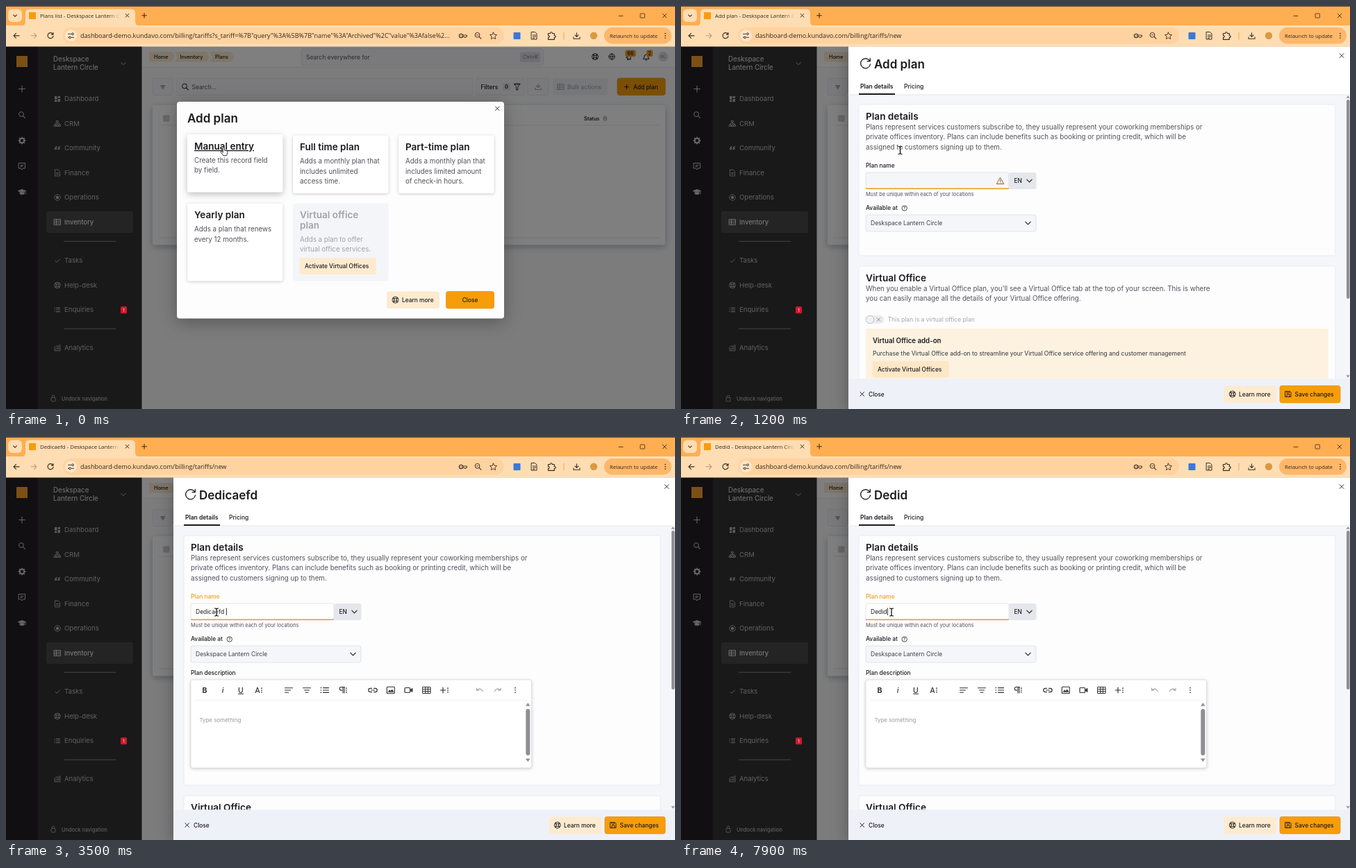
An HTML page that plays this animation: 963 px wide and 581 px high, repeating every 8 s.

```html
<!DOCTYPE html>
<html lang="en">
<head>
<meta charset="utf-8">
<title>Add plan</title>
<style>
html, body { margin: 0; width: 100%; height: 100%; overflow: hidden; background: #fff; }
svg { display: block; width: 963px; height: 581px; font-family: Inter, Roboto, sans-serif; }
text { white-space: pre; }
.chrome { font-family: "Open Sans", "Noto Sans", sans-serif; }
.card { filter: drop-shadow(0 1px 2px rgba(0,0,0,.2)); }
.lift { filter: drop-shadow(0 3px 5px rgba(0,0,0,.25)); }
.float { filter: drop-shadow(0 5px 12px rgba(0,0,0,.3)); }
</style>
</head>
<body>
<svg id="stage" viewBox="0 0 963 581"></svg>
<script>
const INK = '#1b1b1f', GREY = '#52525b', PALE = '#a3a5ae', LINE = '#e3e4e9';
const AMBER = '#f79d0a', CREAM = '#fdebd0', NAV = '#b9b7ba', THUMB = '#8f8f93';
const BODY = 9.77, SMALL = 8.5;
const SPACE = ['Deskspace', 'Lantern Circle'], PLACE = SPACE.join(' ');

// y is the vertical centre of the text
const T = (x, y, size, str, c = INK, w = 400, more = '') =>
  `<text x="${x}" y="${y + size * .36}" font-size="${size}" fill="${c}" font-weight="${w}" ${more}>${str}</text>`;
const R = (x, y, w, h, c, r = 0, more = '') =>
  `<rect x="${x}" y="${y}" width="${w}" height="${h}" rx="${r}" fill="${c}" ${more}/>`;
const P = (d, c = INK, w = 1, fill = 'none', more = '') =>
  `<path d="${d}" stroke="${c}" stroke-width="${w}" fill="${fill}" stroke-linecap="round" stroke-linejoin="round" ${more}/>`;
const C = (x, y, r, c, w = 0, fill = 'none') =>
  `<circle cx="${x}" cy="${y}" r="${r}" stroke="${c}" stroke-width="${w}" fill="${w ? fill : c}"/>`;
const G = (x, y, body, turn = 0) => `<g transform="translate(${x} ${y}) rotate(${turn})">${body}</g>`;
const border = c => `stroke="${c}" stroke-width=".8"`;
const middle = 'text-anchor="middle"';
const lines = (x, y, rows) => rows.map((s, i) => T(x, y + i * 14.6, BODY, s, GREY)).join('');
const action = (x, y, w, h = 24.5) => R(x, y, w, h, AMBER, 3, border('#e8930a'));

// Icons, centred on x, y
const cross = (x, y, r, c = INK, w = 1) => P(`M${x - r} ${y - r}l${2 * r} ${2 * r}m0 ${-2 * r}l${-2 * r} ${2 * r}`, c, w);
const plus = (x, y, r, c = INK, w = 1.1) => P(`M${x - r} ${y}h${2 * r}M${x} ${y - r}v${2 * r}`, c, w);
const chevron = (x, y, r, c = INK, w = 1.1) => P(`M${x - r} ${y - r / 2}l${r} ${r}l${r} ${-r}`, c, w);
const lens = (x, y, c = INK, r = 3.4) => C(x - 1, y - 1, r, c, 1) + P(`M${x + 1.6} ${y + 1.6}l2.8 2.8`, c, 1.1);
const buoy = (x, y, c = INK, r = 4.4) => C(x, y, r, c, 1) + C(x, y, r * .45, c, .9) +
  [45, 135, 225, 315].map(a => G(x, y, P(`M${r * .5} 0H${r}`, c, 1.4), a)).join('');
const gear = (x, y, c) => C(x, y, 3.2, c, 2) + [0, 45, 90, 135].map(a => G(x, y, P('M0-4.6v1.4M0 3.2v1.4', c, 1.8), a)).join('');
const sorter = (x, y) => P(`M${x - 2.5} ${y - 1.2}l2.5-2.8 2.5 2.8zm0 2.4l2.5 2.8 2.5-2.8z`, '#85858d', .8);
const rows = (x, y, widths, gap = 2.6, c = INK) => widths.map((w, i) =>
  P(`M${x} ${y + (i - (widths.length - 1) / 2) * gap}h${w}`, c, 1.1)).join('');
const dots = (x, y, c = INK, gap = 2.8) => [-1, 0, 1].map(i => C(x, y + i * gap, .85, c)).join('');
const disk = (x, y) => P(`M${x - 4} ${y - 4}h6.5l1.5 1.5v6.5h-8zM${x - 2} ${y - 4}v2.5h3.5v-2.5M${x - 2} ${y + 4}v-3.5h4v3.5`, INK, .9);
const download = (x, y, c) => G(x, y, P('M0-4V1.5M-2.5-1L0 1.5 2.5-1M-4.5 2V4.5h9V2', c, 1.1));
const table = (x, y, c) => P(`M${x - 4.5} ${y - 4}h9v8h-9zm0 2.6h9m-9 2.7h9M${x - 1.5} ${y - 4}v8`, c, .9);

function browser() {
  const k = '#3c2e20', bar = '#ffddb3';
  return `<g class="chrome">` + R(0, 0, 963, 29, '#ffae51') + R(0, 0, 963, 1, '#6e4c28') +
    R(3, 4.5, 20, 18.5, bar, 6) + chevron(13, 14, 2.4, k) +
    P('M22 28.5q6 0 6-6v-12q0-6 6-6h146q6 0 6 6v12q0 6 6 6z', 'none', 0, bar) +
    R(33, 9, 10, 10, AMBER) +
    `<text id="tab" x="49" y="16.8" font-size="7.8" fill="#33271c" clip-path="url(#tabClip)"></text>` +
    R(148, 8, 16, 13, 'url(#fade)') + cross(174.5, 13.7, 2.4, k) + plus(199, 13.7, 3.4, k) +
    P('M882 14.3h6', k, .9) + R(913, 11, 6.4, 6, 'none', .6, border(k)) + cross(948, 14, 2.8, k, .9) +
    R(0, 28, 963, 30.5, bar) +
    P('M19 42.8h-8m3.5-3.5L11 42.8l3.5 3.5', k, 1.2) + P('M36 42.8h8m-3.5-3.5l3.5 3.5-3.5 3.5', '#b99a78', 1.1) +
    P('M67.6 40.8a4 4 0 1 0 .4 2.6M68 38.5v2.6h-2.6', k, 1.2) +
    R(82, 30.8, 635, 24, '#ffd3a0', 12) + C(93.5, 42.8, 8.5, '#ffe6ca') +
    P('M89.5 40.3h4M89.5 45.3h1m4 0h3', k, 1) + C(96, 40.3, 1.4, k, 1) + C(92, 45.3, 1.4, k, 1) +
    `<text id="url" x="107" y="46" font-size="9.08" fill="#33271c"></text>` +
    C(655, 43, 2.7, k, 1.1) + C(655, 43, .8, k) + P('M658 42h5.5v2.2h-1.5v1h-2v-1h-2', k, .9) +
    lens(679.5, 42.8, k) + P('M677 41.8h3', k, .8) +
    P('M701.5 38l1.5 3.2 3.5.4-2.6 2.4.7 3.5-3.1-1.7-3.1 1.7.7-3.5-2.6-2.4 3.5-.4z', k, .9) +
    R(730.5, 38, 10, 10, '#3b78d8', 1) +
    P('M756.5 37.5h5l2.5 2.5v8h-7.5zM758.5 42h4m-4 2.2h4m-4 2.2h2', k, 1) +
    P('M780.5 39.5h3q0-2 1.4-2t1.4 2h3v3q2 0 2 1.4t-2 1.4v3h-8.8v-3q1.7 0 1.7-1.4t-1.7-1.4z', k, 1.2) +
    P('M803 38v10', '#f3a54d', 1) + download(821.5, 42.8, k) + C(846, 42.8, 5.2, '#d99a3d') +
    R(861, 31, 97, 23.5, '#ffb769', 11.8) + T(869, 42.8, 7.6, 'Relaunch to update', '#33271c', 500) + dots(949, 42.8, k, 3.2) + `</g>`;
}

function sidebar() {
  const items = [['Dashboard', 134], ['CRM', 169.5], ['Community', 205], ['Finance', 240.5], ['Operations', 276],
    ['Inventory', 311.5], ['Tasks', 367], ['Help-desk', 402.5], ['Enquiries', 438], ['Analytics', 493]];
  const icons = [
    R(-4, -4, 3.4, 4.6, NAV) + R(.6, -4, 3.4, 2.8, NAV) + R(-4, 1.6, 3.4, 2.6, NAV) + R(.6, 0, 3.4, 4.2, NAV),
    P('M-1.3-4h2.6v2h-2.6zM0-2V0M-3.2 2V0h6.4v2M-4.4 2h2.4v2h-2.4zm3.3 0h2.4v2h-2.4zm3.3 0h2.4v2h-2.4z', NAV, .9),
    P('M-.8-2.5q-3 1-2.7 4h2v-2.2h-1.6M3.6-2.5q-3 1-2.7 4h2v-2.2H1.3', NAV, 1.1),
    P('M-3.2-4.5h4.2l2.5 2.5v6.5h-6.7zM-1.5 0h3.2m-3.2 2h3.2', NAV, .9),
    C(0, 0, 4.2, NAV, .9) + R(-2, -2, 4, 4, NAV, 1),
    table(0, 0, '#e8e7e9'),
    P('M-3 .5l2 2 4.5-4.5', NAV, 1),
    buoy(0, 0, NAV, 4.2),
    rows(-1.5, 0, [5, 5, 5], 2.6, NAV) + rows(-4, 0, [.3, .3, .3], 2.6, NAV),
    P('M-4-1v5h8v-8M-2 2v-1.5M0 2v-3M2 2v-4M-3-2l2-1 2 .5 2-2', NAV, .9)];
  const c = '#cbc9cc';
  return R(0, 58, 46, 523, '#221f22') + R(46, 58, 149.5, 523, '#343235') + R(15, 72, 16, 16, '#f7a12c') +
    plus(23, 119.5, 4.4, c) + lens(23, 157, c) + gear(23, 194, c) +
    P('M18.5 226.5h9v7.5h-3l-1.5 2-1.5-2h-3zM21 229.5h4m-4 2h2.5', c, 1) +
    P('M17.5 266.5l5.5-2 5.5 2-5.5 2zM20 268.5v2.5q3 1.5 6 0v-2.5M28 267v4', c, .9, c) +
    T(68, 77, 9.7, SPACE[0], '#d6d4d7', 500) + T(68, 89, 9.7, SPACE[1], '#d6d4d7', 500) + chevron(169, 83, 3.3, NAV, 1) +
    R(58, 296, 125, 31, '#4a484b', 3) +
    items.map(([s, y], i) => G(74, y, icons[i]) + T(84, y, i == 5 ? 9.3 : 9.6, s, i == 5 ? '#f2f1f3' : '#c3c1c4', i == 5 ? 500 : 400)).join('') +
    P('M83.5 339.3h74.5M83.5 465.3h74.5', '#a09ea1', .8) +
    R(65, 564.5, 6, 5.5, 'none', 1, border(NAV)) + P('M66.3 564v-1.2a1.7 1.7 0 0 1 3.4 0v1.2', NAV, .8) +
    T(80, 566, 7.4, 'Undock navigation', '#bab8bb', 500);
}

const badge = R(165, 433.3, 9, 10, '#cf1a2c', 1.5, 'id="badge"') + T(169.5, 438.3, 6.8, '1', '#f4e4e4', 400, middle);

function listPage() {
  const crumb = (x, w, s, tx) => P(`M${x} 66h${w}l4 7.2-4 7.2h${-w}l${x > 210 ? 4 : 0}-7.2z`, 'none', 0, '#fdecd2') + T(tx, 73.2, 7.3, s, INK, 500);
  const field = (x, w, y = 104, h = 24.5) => R(x, y, w, h, '#f5f6f9', 3, border(LINE));
  const note = (x, w, s) => R(x, 63.5, w, 9.5, '#f2a127', 2) + T(x + w / 2, 68.3, 7, s, INK, 500, middle);
  return R(195.5, 58, 768, 523, '#f9fafc') + R(195.5, 58, 768, 30, '#fff') + P('M196 88h767', LINE, .8) +
    crumb(206, 33, 'Home', 213) + crumb(243, 46, 'Inventory', 250.5) + crumb(293, 31, 'Plans', 301) +
    field(425, 348.5, 61.5, 24) + T(432, 73.5, SMALL, 'Search everywhere for', GREY) +
    R(740, 66.5, 29, 14.5, '#dfe0e6', 2) + T(744, 73.7, 7.2, 'Ctrl+K', '#71717a') +
    buoy(848, 73, INK) + C(872, 73, 4.2, INK, .9) + P('M868 73h8M872 69q-3.5 4 0 8q3.5-4 0-8', INK, .8) +
    P('M893 74l6-3v6zM894.5 75.5v2h2', INK, 1) + P('M917.5 76q1.3-1 1.3-3.3 0-2.7 2.7-2.7t2.7 2.7q0 2.3 1.3 3.3zM920.5 78h2', INK, 1) +
    note(891.5, 15, '66') + note(922, 9, '2') + C(946, 73, 7.2, '#dcdde3') + T(946, 73.2, 6, 'AL', '#77777f', 400, middle) +
    field(211, 29) + [6, 3.6, 1.2].map((w, i) => P(`M${225.7 - w / 2} ${115 + i * 2}h${w}`, GREY, .9)).join('') +
    field(246, 426) + lens(258, 116.5) + T(267.5, 116.5, SMALL, 'Search...', GREY) +
    field(677, 69) + T(683.5, 116.5, 8.4, 'Filters', INK, 500) + R(715, 111, 11, 11, '#e3e4ea', 2) + T(718, 116.7, 7.3, '0', INK, 600) +
    P('M731.5 112.5q4.2-2 8.5 0l-3.2 4v4.5h-2.2v-4.5zq4.2 2 8.5 0', INK, .9) +
    field(750, 31) + download(766, 116, PALE) +
    R(787, 104, 79, 24.5, '#eeeff3', 3) + table(798.5, 116.5, PALE) + T(808, 116.5, 8.4, 'Bulk actions', PALE, 500) +
    action(880, 104, 69) + plus(893.5, 116.5, 3) + T(903, 116.5, 8.4, 'Add plan', INK, 500) +
    R(211, 143, 738, 201.5, '#fff', 3, 'class="lift"') + R(226, 157.3, 9.5, 9.5, '#cfcfd4', 2) +
    T(245.5, 162, 7.2, 'Name', INK, 600) + P('M273 165v-6m-2.5 2.5l2.5-2.5 2.5 2.5', INK, .9) +
    T(577.5, 162, 7.2, 'Price', INK, 600) + sorter(603, 162) + T(618, 162, 7.2, 'Frequency', INK, 600) +
    T(832, 162, 7.2, 'Status', INK, 600) + sorter(862.3, 162) + P('M220 172h720M220 334h720', LINE, .8) +
    C(573, 207.5, 4.6, '#4a4a52', 1.2) + C(586.7, 207.5, 4.6, '#4a4a52', 1.2) +
    P('M577.5 207q2.3-1.5 4.6 0M568.3 207v-9q0-3 3-3M591.5 207v-9q0-3-3-3', '#4a4a52', 1.2) +
    T(580, 233.5, BODY, 'No items found', '#3f3f46', 400, middle) +
    R(518.5, 246, 122.5, 19, '#e8e9ee', 2) + T(580, 255.5, 8.4, 'Show data for all locations', INK, 500, middle) +
    P('M564 280h31', LINE, 1) + R(542, 295, 75.5, 19, '#e8e9ee', 2) + buoy(554, 304.5) + T(563.5, 304.5, 8.4, 'Learn more', INK, 500);
}

function modal() {
  const card = (x, y, h, title, text, cls = 'card', deco = '') =>
    R(x, y, 137.5, h, '#fff', 3, `class="${cls}"`) + T(x + 10, y + 17, 13.5, title, INK, 600, deco) + lines(x + 10, y + 37, text);
  return R(246, 138, 471, 312.5, '#fdfdfe', 4, 'class="float"') + T(261, 162, 17, 'Add plan', INK, 600) + cross(707.3, 147.8, 2.8, INK, .9) +
    card(261, 185, 83.5, 'Manual entry', ['Create this record field', 'by field.'], 'lift', 'text-decoration="underline"') +
    card(413, 186.5, 83.5, 'Full time plan', ['Adds a monthly plan that', 'includes unlimited', 'access time.']) +
    card(565, 186.5, 83.5, 'Part-time plan', ['Adds a monthly plan that', 'includes limited amount', 'of check-in hours.']) +
    card(261, 284.5, 112, 'Yearly plan', ['Adds a plan that renews', 'every 12 months.']) +
    R(413, 284.5, 137.5, 112, '#f4f5f8', 3) +
    `<g opacity=".5">` + T(423, 301.3, 13.5, 'Virtual office', GREY, 600) + T(423, 316, 13.5, 'plan', GREY, 600) +
    lines(423, 336, ['Adds a plan to offer', 'virtual office services.']) + `</g>` +
    R(422.5, 363, 110.5, 24, CREAM, 3) + T(430, 375, 8.4, 'Activate Virtual Offices', INK, 500) +
    R(548, 411.5, 76, 24.5, CREAM, 3) + buoy(560.5, 423.7) + T(570, 423.7, 8.4, 'Learn more', INK, 500) +
    action(633.5, 411.5, 69) + T(668, 423.7, 8.4, 'Close', INK, 500, middle);
}

function editor() {
  const y = 365, k = '#2f2f35', glyph = (x, s, more = '', w = 500) => T(x, y, 10.5, s, k, w, `${middle} ${more}`);
  return T(266, 340.2, 8.4, 'Plan description', INK, 500) + R(266, 350, 490.5, 127, '#fff', 3, border('#dcdde3') + ' class="card"') +
    P('M272 379.5h478', '#ececf0', .8) + glyph(286, 'B', '', 700) + glyph(312, 'i', 'font-style="italic"') + glyph(338, 'U', 'text-decoration="underline"') +
    glyph(362, 'A') + dots(368, y, k) +
    rows(401.5, y, [11, 8, 5], 3.2, k) + rows(427.5, 361.8, [11], 0, k) + rows(429.5, y, [7], 0, k) + rows(431, 368.2, [4], 0, k) +
    rows(456.5, y, [8, 8, 8], 3.4, k) + rows(453, y, [.8, .8, .8], 3.4, k) +
    P('M485 369v-8.5h-2.5a2.3 2.3 0 0 0 0 4.6h1M487 360.5v8.5M485 360.5h2.5', k, 1.1) + dots(490, y, k) +
    P('M526.5 362.3h-2a2.7 2.7 0 0 0 0 5.4h2M529.5 362.3h2a2.7 2.7 0 0 1 0 5.4h-2M525.5 365h5', k, 1.2) +
    R(548.3, 360.3, 11, 9.4, 'none', 1, `stroke="${k}" stroke-width="1.1"`) + P('M550 367.5l2.2-2.8 1.6 1.8 2-2.5 2.2 3.5z', k, .6, k) +
    R(574, 361.5, 7.6, 7, 'none', 1, `stroke="${k}" stroke-width="1.2"`) + P('M582 364.5l3-2.3v5.6l-3-2.3z', k, .7, k) +
    P('M600 360.5h11v9h-11zm0 3h11m-11 3h11M603.7 360.5v9m3.7-9v9', k, 1) +
    plus(629, y, 3.8, k, 1.2) + dots(636, y, k) +
    P('M677.5 362v3.2h3.2M677.8 365q5-4.5 8.5 1.5', PALE, 1.2) + P('M712 362v3.2h-3.2M711.7 365q-5-4.5-8.5 1.5', PALE, 1.2) + dots(733, y, k, 3.3) +
    T(278.5, 408, 7.9, 'Type something', '#9a9aa2') +
    P('M748.5 387.5l2.8-4 2.8 4zM748.5 464l2.8 4 2.8-4z', THUMB, .5, THUMB) + R(748.3, 392, 6, 67, THUMB, 3);
}

function drawer() {
  const box = (y, h) => R(256, y, 686, h, '#fdfdfe', 3, border('#e6e7ec'));
  return R(241, 58.5, 722, 523, '#f5f6f9', 0, 'class="float"') + R(241, 58.5, 722, 69.5, '#fff') + P('M241 128h722', LINE, .8) +
    P('M271.5 79a7 7 0 1 0 1 5M272.3 75.5v4.2h-4.2', INK, 1.3) +
    `<text id="heading" x="278" y="89.8" font-size="17" font-weight="600" fill="${INK}"></text>` + cross(951, 71.5, 2.9, INK, .9) +
    T(258, 115.5, SMALL, 'Plan details', INK, 600) + T(321, 115.5, SMALL, 'Pricing', INK, 500) + R(256, 126, 52, 2, INK) +
    `<g clip-path="url(#body)">` +
    `<g id="shortCard">${box(142, 218)}</g><g id="tallCard">${box(142, 360)}${editor()}</g>` +
    T(266, 159.3, 13.6, 'Plan details', INK, 600) +
    lines(266, 174.3, ['Plans represent services customers subscribe to, they usually represent your coworking memberships or',
      'private offices inventory. Plans can include benefits such as booking or printing credit, which will be', 'assigned to customers signing up to them.']) +
    T(266, 230.2, 8.4, 'Plan name', INK, 500, 'id="label"') + R(266, 240, 206, 24, '#f5f6f9', 3, border('#dcdde3') + ' id="input"') +
    R(472, 240, 39.5, 24, '#e6e7ed', 3) + R(266, 262.5, 206, 1.5, '#f0a01e') + T(479.5, 252, 8.4, 'EN', INK, 500) + chevron(501.5, 252, 3.7) +
    P('M459.7 247.5l5 9h-10zM459.7 250.5v2.6m0 1.5v.3', '#8f5f30', 1, 'none', 'id="warn"') +
    `<text id="typed" x="273" y="255" font-size="${SMALL}" fill="${INK}"></text>` + R(0, 246.5, .9, 10.5, INK, 0, 'id="caret"') +
    T(266, 271.5, 7.33, 'Must be unique within each of your locations', GREY) + T(266, 291.3, 8.4, 'Available at', INK, 500) +
    C(321.7, 291.5, 3.7, INK, .8) + T(321.7, 291.6, 5.5, '?', INK, 500, middle) +
    R(266, 301, 245, 24, '#f5f6f9', 3, border('#dcdde3')) + T(273, 313, SMALL, PLACE, '#3f3f46') + chevron(499.5, 313, 3.7) +
    `<g id="office">` + box(375, 230) + T(266, 392, 13.6, 'Virtual Office', INK, 600) +
    lines(266, 407, ["When you enable a Virtual Office plan, you'll see a Virtual Office tab at the top of your screen. This is where",
      'you can easily manage all the details of your Virtual Office offering.']) +
    R(266, 446, 26.5, 12, '#ececf0', 6) + C(272, 452, 5.7, '#b4b5bd', .8, '#f1f1f4') + cross(284.5, 452, 2.5, '#85858d', .9) +
    T(297.5, 452, 8.55, 'This plan is a virtual office plan', PALE) +
    R(266, 465, 666, 90, '#fdf2e0', 2) + T(276, 482.3, 9.7, 'Virtual Office add-on', INK, 600) +
    T(276, 501, 8.59, 'Purchase the Virtual Office add-on to streamline your Virtual Office service offering and customer management', '#33333a') +
    R(275.5, 512, 110, 24, '#fde7c6', 3) + T(283, 524, 8.4, 'Activate Virtual Offices', INK, 500) + `</g></g>` +
    P('M957.8 132.5l2.3-3 2.3 3zM957.8 532.5l2.3 3 2.3-3z', THUMB, .3, THUMB) + R(958, 135, 4.5, 287, THUMB, 2.2, 'id="thumb"') +
    R(241, 537.5, 722, 44, '#eff1f8') + cross(260.7, 559.5, 2.8, INK, 1) + T(270, 559.5, 8.4, 'Close', INK, 500) +
    R(781.5, 547.5, 75.5, 24.5, CREAM, 3) + buoy(793.7, 559.5) + T(803, 559.5, 8.4, 'Learn more', INK, 500) +
    action(862, 547.5, 87) + disk(874, 559.5) + T(883.5, 559.5, 8.4, 'Save changes', INK, 500);
}

const hand = P('M-1.8 1.5V-5a1.1 1.1 0 0 1 2.2 0V-1.5l3.2.7q1.3.4 1.2 1.7l-.6 3.3-.8 2h-4.6l-1.2-1.8-2.5-3q-.6-1.2.4-1.5t1.7.9z', '#000', .8, '#fff');
const beamPath = 'M-2.5-5.5q2 0 2.5 1 .5-1 2.5-1M0-4.5v9M-2.5 5.5q2 0 2.5-1 .5 1 2.5 1';
const beam = P(beamPath, '#fff', 2.4) + P(beamPath, '#000', 1.2);

const $ = id => document.getElementById(id);
$('stage').innerHTML = `<defs><clipPath id="tabClip"><rect x="49" y="6" width="114" height="18"/></clipPath>
  <clipPath id="body"><rect x="241" y="128.5" width="722" height="409"/></clipPath>
  <linearGradient id="fade"><stop stop-color="#ffddb3" stop-opacity="0"/><stop offset="1" stop-color="#ffddb3"/></linearGradient></defs>` +
  listPage() + sidebar() + R(0, 58, 963, 523, '#000', 0, 'id="shade"') + badge +
  `<g id="modal">${modal()}</g><g id="drawer">${drawer()}</g>` + browser() +
  `<g id="pointer"><g id="hand">${hand}</g><g id="beam">${beam}</g></g>`;

// Keystrokes as [time, text]; '<' deletes a character
const keys = [[1900, '']];
const press = (start, step, str) => [...str].forEach((ch, i) => {
  const now = keys[keys.length - 1][1];
  keys.push([start + i * step, ch == '<' ? now.slice(0, -1) : now + ch]);
});
press(2370, 120, 'Dedicaefd ');
press(3900, 130, '<<<');
press(4450, 170, 'd DE');
press(5560, 75, '<'.repeat(10));
press(6900, 260, 'edid');

const path = [[1500, 315.5, 208], [1800, 304, 238], [1900, 303, 252.5]];
function pointerAt(t) {
  if (t < 1000) return [314, 209.5];
  if (t <= 1500) return path[0].slice(1);
  const i = path.findIndex(p => p[0] >= t);
  if (i < 0) return path[2].slice(1);
  const [a, b] = [path[i - 1], path[i]], k = (t - a[0]) / (b[0] - a[0]);
  return [1, 2].map(j => a[j] + (b[j] - a[j]) * k);
}
const show = (id, on) => $(id).style.display = on ? '' : 'none';
const attr = (id, name, v) => $(id).setAttribute(name, v);

function draw(t) {
  const shown = Math.min(1, Math.max(0, (t - 992) / 200)), loaded = t >= 1400, focus = t >= 1900;
  const [last, text] = keys.filter(k => k[0] <= t).pop() || [0, ''];
  // The tab title follows only once typing pauses
  const settled = keys.filter((k, i) => Math.min(t, i + 1 < keys.length ? keys[i + 1][0] : t) - k[0] >= 110).pop() || [0, ''];
  const title = t < 1200 ? 'Plans list' : settled[1].trim() || 'Add plan';

  $('tab').textContent = `${title} - ${PLACE}`;
  $('url').textContent = 'dashboard-demo.kundavo.com/billing/tariffs' + (t < 1000 ?
    '?s_tariff=%7B"query"%3A%5B%7B"name"%3A"Archived"%2C"value"%3Afalse%2...' : '/new');
  show('modal', t < 1000);
  show('drawer', t >= 1000);
  $('drawer').style.opacity = shown;
  $('shade').style.opacity = .5 * (t < 1000 ? 1 : shown);
  attr('badge', 'fill', t >= 1000 && t < 1100 ? '#d9781f' : '#cf1a2c');
  show('shortCard', !loaded);
  show('tallCard', loaded);
  attr('office', 'transform', `translate(0 ${loaded ? 142 : 0})`);
  attr('thumb', 'height', loaded ? 229 : 287);
  $('heading').textContent = text.trim() || 'Add plan';
  $('typed').textContent = text;
  attr('label', 'fill', focus ? '#f0a01e' : INK);
  attr('input', 'fill', focus ? '#fff' : '#f5f6f9');
  show('warn', !text);
  show('caret', focus && (t - last) % 1000 < 500);
  if (focus) attr('caret', 'x', 273.3 + $('typed').getComputedTextLength());
  const isHand = t < 1000 || (t >= 1700 && t < 1900);
  show('hand', isHand);
  show('beam', !isHand);
  attr('pointer', 'transform', `translate(${pointerAt(t)})`);
}

const start = performance.now();
function tick() {
  const t = (performance.now() - start) % 8000;
  draw(Math.floor(t / 100) * 100);
  requestAnimationFrame(tick);
}
tick();
</script>
</body>
</html>
```
